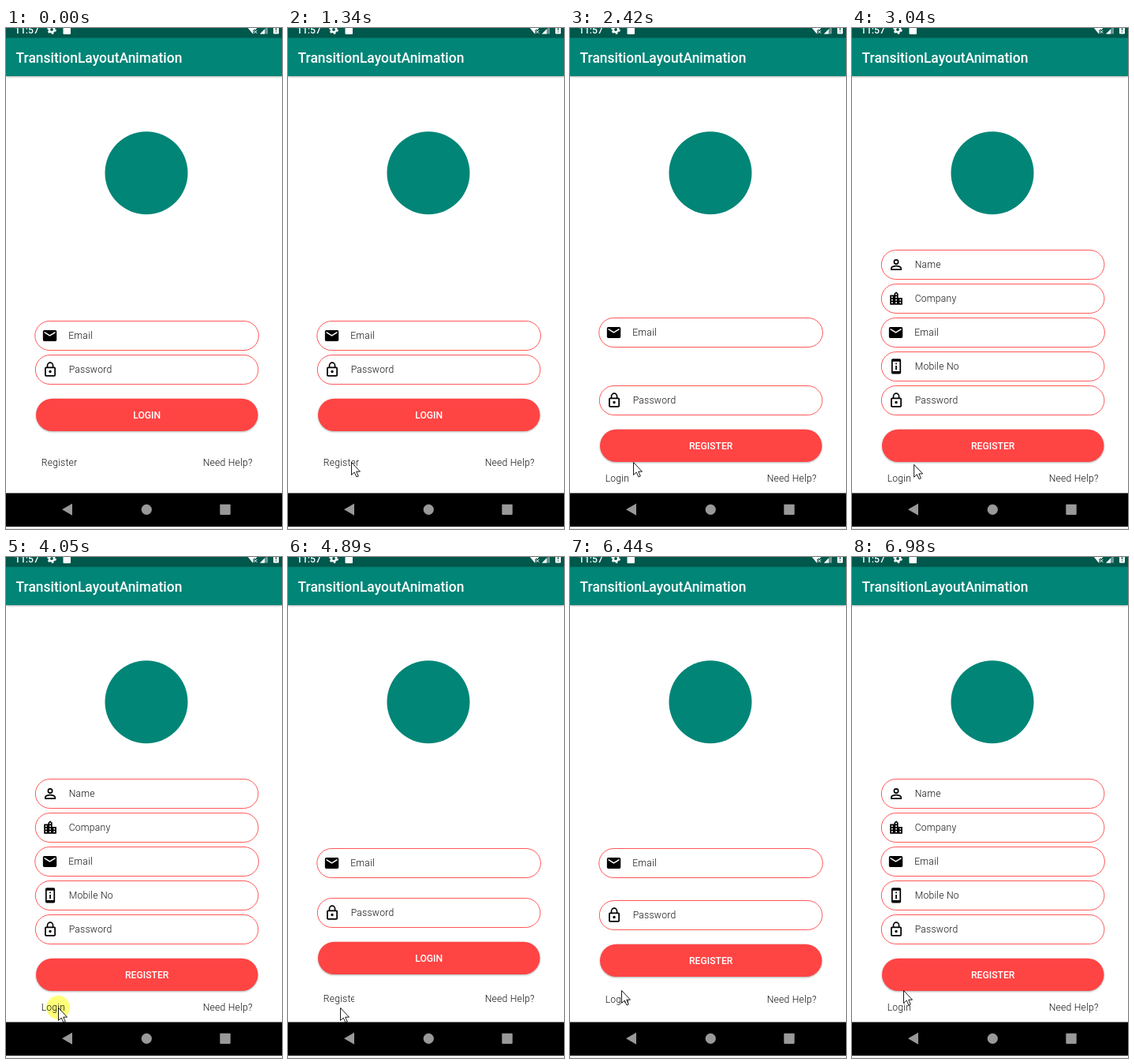
An HTML page for the animation above (8000 ms loop, 350 by 635 pixels).

```html
<!DOCTYPE html>
<html lang="en">
<head>
<meta charset="utf-8">
<title>Form transition</title>
<style>
  html, body { margin: 0; width: 100%; height: 100%; overflow: hidden; background: #fff; }
  svg { display: block; width: 350px; height: 635px; font: 300 12.2px Roboto, sans-serif; letter-spacing: .2px; fill: #111; }
  .field rect { fill: #fff; stroke: #f44; stroke-width: .9; }
  .field path { fill: #000; }
  .title { font-size: 17.45px; font-weight: 500; letter-spacing: 0; fill: #fff; }
  .clock { font-weight: 500; letter-spacing: 0; fill: #fff; }
  .label { font-weight: 500; letter-spacing: 0; fill: #fff; text-anchor: middle; }
  .shadow { filter: drop-shadow(0 1.2px 1.2px rgba(0, 0, 0, .32)); }
  #halo { fill: #ffff78; mix-blend-mode: multiply; }
</style>
</head>
<body>
<svg viewBox="0 0 350 635">
  <defs>
    <clipPath id="linkClip"><rect id="linkBounds" x="44" y="538" height="26"/></clipPath>
  </defs>
  <rect width="350" height="635" fill="#fff"/>

  <rect class="shadow" y="12" width="350" height="49" fill="#008577"/>
  <rect width="350" height="12.5" fill="#00574b"/>
  <text class="title" x="12.5" y="44">TransitionLayoutAnimation</text>
  <text class="clock" x="11" y="7">11:57</text>
  <g fill="#fff">
    <circle cx="58" cy="2" r="3.2" fill="none" stroke="#fff" stroke-width="2.6"/>
    <circle cx="58" cy="2" r="5" fill="none" stroke="#fff" stroke-width="1.6" stroke-dasharray="2.6 2.63"/>
    <rect x="72.5" y="-3" width="9.5" height="11" rx="1"/>
    <path d="M306 -1H319L313 7.5Z"/>
    <path d="M314 2.5l4.5 4.5m0-4.5l-4.5 4.5" stroke="#00574b" stroke-width="3"/>
    <path d="M314.5 3l3.8 3.8m0-3.8l-3.8 3.8" stroke="#fff"/>
    <path d="M322 7.5L332 -2.5V7.5Z" opacity=".4"/>
    <path d="M322 7.5L328 1.5V7.5Z"/>
    <rect x="339" y="-3" width="7" height="10.5" rx="1"/>
    <path d="M342.5 -1v4m0 1.2v1.3" stroke="#00574b" stroke-width="1.2"/>
  </g>

  <circle cx="178" cy="183.7" r="52.5" fill="#008577"/>

  <g id="fields"></g>
  <g id="button">
    <rect class="shadow" x="38" y="469.7" width="281.5" height="41.3" rx="20.6" fill="#f44"/>
    <text id="buttonLabel" class="label" x="178.7" y="495"></text>
  </g>
  <g id="links">
    <text id="link" x="44.7" y="555" clip-path="url(#linkClip)"></text>
    <text x="249.7" y="555">Need Help?</text>
  </g>

  <rect y="589.5" width="350" height="42.5" fill="#000"/>
  <rect y="632" width="350" height="3" fill="#f7f4f4"/>
  <g fill="#999">
    <path d="M71 610.3L84 602.8V617.8Z"/>
    <circle cx="178.3" cy="610.3" r="6.6"/>
    <rect x="271.3" y="603.7" width="13.4" height="13.2" rx=".8"/>
  </g>

  <circle id="halo" r="15"/>
  <path id="cursor" d="M.5 .5V16.5L4.2 13.1L7 19L9.3 18L6.7 12.2H11.5Z" fill="#fff" stroke="#000" stroke-width=".9"/>
</svg>

<script>
const $ = id => document.getElementById(id);
const LOOP = 8000;

const ICONS = {
  person: 'M12 5.9a2.1 2.1 0 1 1 0 4.2a2.1 2.1 0 0 1 0-4.2m0 9c2.97 0 6.1 1.46 6.1 2.1v1.1H5.9V17c0-.64 3.13-2.1 6.1-2.1M12 4a4 4 0 1 0 0 8a4 4 0 0 0 0-8zm0 9c-2.67 0-8 1.34-8 4v3h16v-3c0-2.66-5.33-4-8-4z',
  city: 'M15 11V5l-3-3-3 3v2H3v14h18V11z' +
    [[5, 9], [5, 13], [5, 17], [11, 5], [11, 9], [11, 13], [11, 17], [17, 13], [17, 17]]
      .map(([x, y]) => `M${x} ${y}h2v2h-2z`).join(''),
  mail: 'M20 4H4a2 2 0 0 0-2 2v12a2 2 0 0 0 2 2h16a2 2 0 0 0 2-2V6a2 2 0 0 0-2-2zm0 4l-8 5-8-5V6l8 5 8-5z',
  phone: 'M7 1a2 2 0 0 0-2 2v18a2 2 0 0 0 2 2h10a2 2 0 0 0 2-2V3a2 2 0 0 0-2-2zM7 5h10v14H7zM11 7h2v2h-2zM11 11h2v6h-2z',
  lock: 'M12 13a2 2 0 1 0 0 4a2 2 0 0 0 0-4zM18 8h-1V6A5 5 0 0 0 7 6v2H6a2 2 0 0 0-2 2v10a2 2 0 0 0 2 2h12a2 2 0 0 0 2-2V10a2 2 0 0 0-2-2zM8.9 6a3.1 3.1 0 0 1 6.2 0v2H8.9zM18 20H6V10h12z'
};

// Centre heights in the login and register layouts; extra fields exist only in the latter.
const FIELDS = [
  { text: 'Name', icon: 'person', register: 300 },
  { text: 'Company', icon: 'city', register: 343 },
  { text: 'Email', icon: 'mail', login: 390, register: 386, outset: .5 },
  { text: 'Mobile No', icon: 'phone', register: 429 },
  { text: 'Password', icon: 'lock', login: 433, register: 472 }
];

for (const field of FIELDS) {
  const out = field.outset || 0;
  const g = document.createElementNS('http://www.w3.org/2000/svg', 'g');
  g.setAttribute('class', 'field');
  g.innerHTML = `<rect x="${37.3 - out}" y="-18.5" width="${282.6 + 2 * out}" height="37" rx="18.5"/>
    <path fill-rule="evenodd" transform="translate(${45.6 - out} -10.5) scale(.87)" d="${ICONS[field.icon]}"/>
    <text x="${79.7 - out}" y="4.3">${field.text}</text>`;
  $('fields').append(g);
  field.node = g;
}

// Each transition: when it starts, and the spans of its move and fade phases.
const TRANSITIONS = [
  { start: 2120, to: 1, move: [2110, 2420], fade: [2425, 2800] },
  { start: 4370, to: 0, move: [4727, 5037], fade: [4390, 4720] },
  { start: 6290, to: 1, move: [6280, 6590], fade: [6595, 6970] }
];
const CLICKS = [[1890, 2040, 80, 550], [4050, 4200, 66, 571], [5970, 6120, 65, 549]];
const POINTER = [
  [320, 253, 628], [1110, 84, 553.5], [1340, 80, 550], [2970, 80, 550], [3270, 66, 571],
  [5370, 66, 571], [5660, 64, 553], [5820, 65, 549], [LOOP, 65, 549]
];

const mix = (a, b, p) => a + (b - a) * p;
const progress = (t, [from, to]) => Math.min(1, Math.max(0, (t - from) / (to - from)));
const ease = p => (1 - Math.cos(Math.PI * p)) / 2;
const place = (node, x, y) => node.setAttribute('transform', `translate(${x} ${y})`);

function layoutAt(t) {
  const current = TRANSITIONS.filter(tr => t >= tr.start).pop();
  if (!current) return { mode: 0, moved: 0, alpha: 0 };
  const toward = span => mix(1 - current.to, current.to, ease(progress(t, span)));
  return { mode: current.to, moved: toward(current.move), alpha: toward(current.fade) };
}

function pointerAt(t) {
  const i = POINTER.findIndex(key => t < key[0]);
  const [t0, x0, y0] = POINTER[i - 1], [t1, x1, y1] = POINTER[i];
  const p = ease(progress(t, [t0, t1]));
  return [mix(x0, x1, p), mix(y0, y1, p)];
}

function draw(t) {
  const { mode, moved, alpha } = layoutAt(t);
  // Layout positions settle on whole pixels.
  const slide = (from, to) => Math.round(mix(from, to, moved));
  for (const { node, login, register } of FIELDS) {
    place(node, 0, login ? slide(login, register) : register);
    node.setAttribute('opacity', login ? 1 : alpha);
  }
  place($('button'), 0, slide(0, 39.2));
  place($('links'), 0, mix(0, 19.6, moved));
  $('buttonLabel').textContent = mode ? 'REGISTER' : 'LOGIN';
  $('link').textContent = mode ? 'Login' : 'Register';
  $('linkBounds').setAttribute('width', mix(47, 31.5, moved));

  const click = CLICKS.find(([from, to]) => t >= from && t < to);
  $('halo').style.display = click ? '' : 'none';
  if (click) place($('halo'), click[2], click[3]);

  const visible = t >= POINTER[0][0];
  $('cursor').style.display = visible ? '' : 'none';
  if (visible) place($('cursor'), ...pointerAt(t));
}

const begin = performance.now();
function tick() {
  draw((performance.now() - begin) % LOOP);
  requestAnimationFrame(tick);
}
tick();
</script>
</body>
</html>
```
